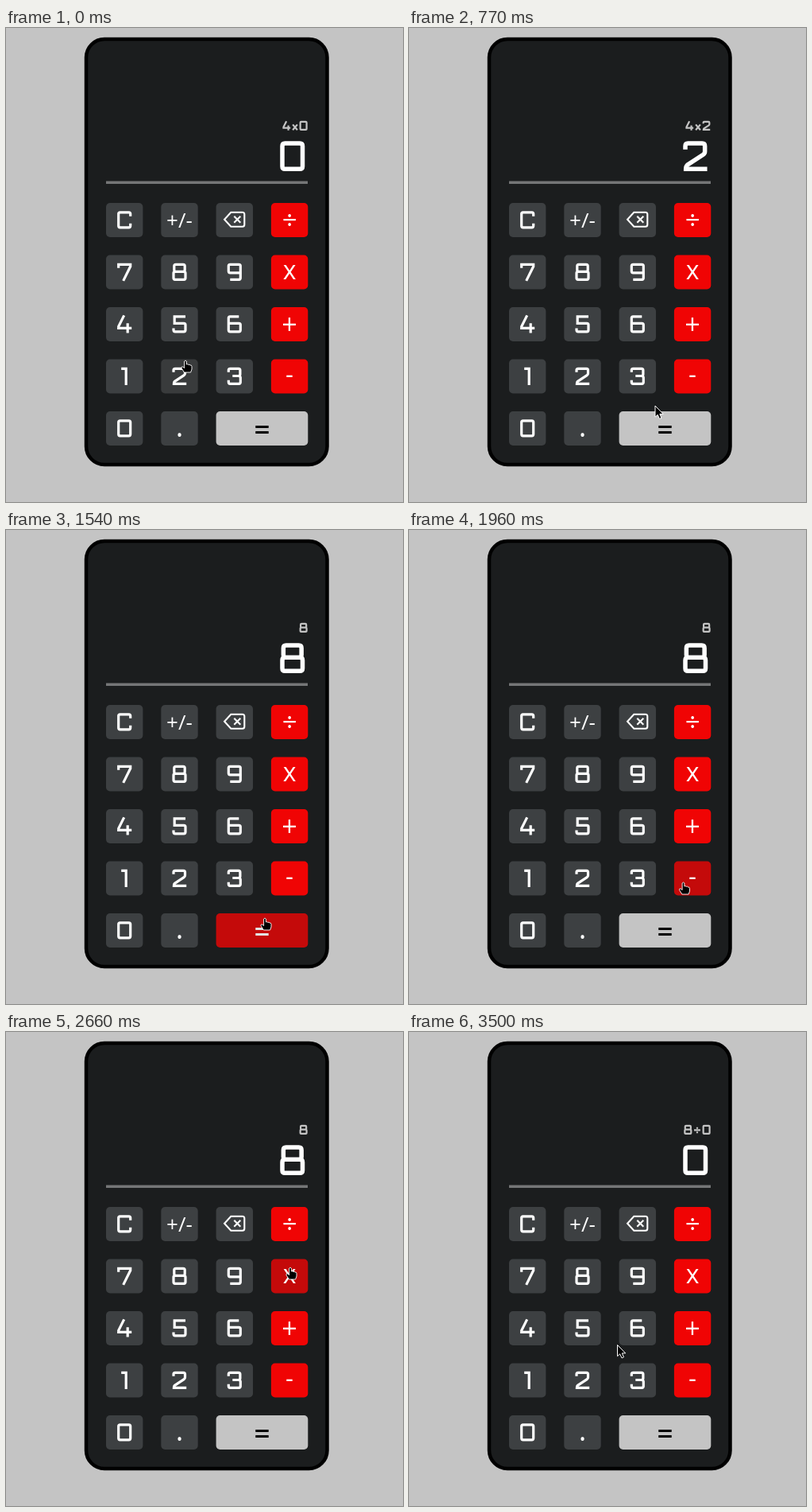
Recreate the animation shown at these times as an HTML page. Size 500 by 596 pixels, loop 3.57 s.

```html
<!DOCTYPE html>
<html lang="en">
<head>
<meta charset="utf-8">
<title>Calculator</title>
<style>
  html, body { margin: 0; width: 100%; height: 100%; overflow: hidden; background: #c4c4c4; }
  svg { display: block; }
  text { font-family: "Open Sans", sans-serif; font-weight: 500; fill: #fff; text-anchor: middle; }
  .key rect { fill: #3d4042; }
  .key.hover rect { fill: #393b3c; }
  .op rect { fill: #f00404; }
  .op.hover rect, .eq.hover rect { fill: #c40a0a; }
  .eq rect { fill: #c4c4c4; }
  .eq text { fill: #000; font-weight: 600; }
  .eq.hover text { fill: #e4e4e4; }
  .line { fill: none; stroke: #fff; stroke-width: 3.2; }
  .line path { vector-effect: non-scaling-stroke; }
  #value { stroke-width: 5.5; }
  #expr { stroke: #c4c4c4; stroke-width: 2.2; }
  .cursor { fill: #000; stroke: #fff; stroke-linejoin: round; }
</style>
</head>
<body>
<svg id="stage" width="500" height="596" viewBox="0 0 500 596">
  <rect x="101" y="14" width="303.5" height="535" rx="23" fill="#1b1d1e" stroke="#000" stroke-width="4.5"/>
  <rect x="126" y="192.5" width="254" height="3.5" fill="#757677"/>
  <g id="expr" class="line"></g>
  <g id="value" class="line"></g>
  <g id="keys"></g>
  <path id="arrow" class="cursor" stroke-width="1"
    d="M0 0V14.2L3.2 11.3L5.5 16.4L8 15.3L5.8 10.4H10.2Z"/>
  <path id="hand" class="cursor" stroke-width=".9"
    d="M-1.4 1Q0 -1 1.4 1V5Q2.8 4.2 3.8 5.4Q5.2 4.7 6 6Q7.8 5.6 8 7.5V11L6.6 15H-1.6L-5 9.6Q-5.2 7.4 -3.2 8L-1.4 9.6Z"/>
</svg>
<script>
const LOOP = 3570;

// Squared glyphs as centre lines in a 15 x 19 box
const GLYPHS = {
  0: 'M2 0H13Q15 0 15 2V17Q15 19 13 19H2Q0 19 0 17V2Q0 0 2 0Z',
  1: 'M3.5 0H9.5V20.6',
  2: 'M0 4.5V2Q0 0 2 0H12.5Q14.5 0 14.5 2V6Q14.5 7.5 13.2 8.4L1.5 16Q.4 17 .4 19H16.2',
  3: 'M0 4.5V2Q0 0 2 0H12.6Q14.6 0 14.6 2V7Q14.6 9.2 12.6 9.2H5M12.6 9.2Q15 9.2 15 11.4V17Q15 19 13 19H2Q0 19 0 17V14.5',
  4: 'M7 -1.4L0 12.5V14.6H16.5M11.5 8.5V20.6',
  5: 'M15 0H1.2V8.5H13Q15 8.5 15 10.5V17Q15 19 13 19H2Q0 19 0 17V14.8',
  6: 'M13 0H2Q0 0 0 2V17Q0 19 2 19H13Q15 19 15 17V10.5Q15 8.5 13 8.5H0',
  7: 'M0 4.5V0H15V2.5L6 20.6',
  8: 'M2.8 0H12.2Q14.2 0 14.2 2V7Q14.2 9 12.2 9H2.8Q.8 9 .8 7V2Q.8 0 2.8 0ZM2 9H13Q15 9 15 11V17Q15 19 13 19H2Q0 19 0 17V11Q0 9 2 9Z',
  9: 'M2 19H13Q15 19 15 17V2Q15 0 13 0H2Q0 0 0 2V8.5Q0 10.5 2 10.5H15',
  C: 'M15 5V2Q15 0 13 0H2Q0 0 0 2V17Q0 19 2 19H13Q15 19 15 17V14',
  x: 'M0 6.5L11 19.5M11 6.5L0 19.5',
  '÷': 'M0 10.5H15M7.5 3.5V7.2M7.5 13.8V17.5'
};

const ROWS = [['C', '+/-', '⌫', '÷'], ['7', '8', '9', 'x'], ['4', '5', '6', '+'], ['1', '2', '3', '-'], ['0', '.', '=']];

// Font size and baseline below the key centre
const LABELS = { '+/-': [26, 9.5], '÷': [33, 11.6], x: [32, 8.5], '+': [34, 12.2], '-': [31, 8.4], '.': [36, 10.5], '=': [35, 13] };

// Time, cursor tip, key under the cursor
const MOVES = [
  [0, 226, 418, '2'], [560, 230, 424, '2'], [700, 270, 452, ''], [770, 310, 475, ''],
  [910, 318, 486, '='], [1120, 324, 490, '='], [1330, 326, 490, '='], [1540, 326, 488, '='],
  [1820, 328, 486, '='], [1960, 345.5, 443, '-'], [2030, 347, 440, '-'], [2170, 356, 380, '+'],
  [2240, 358, 368, '+'], [2380, 361, 323, ''], [2450, 360, 313, 'x'], [2590, 358, 296, 'x'],
  [2800, 354, 250, '÷'], [3080, 353, 250, '÷'], [3220, 322, 302, ''], [3290, 306, 322, '9'],
  [3430, 272, 375, '6'], [3500, 262.5, 393.5, '']
];

// Time, expression, value
const SCREENS = [[0, '4x0', '0'], [490, '4x2', '2'], [1540, '8', '8'], [3080, '8÷0', '0']];

const $ = id => document.getElementById(id);
const keys = {};

function add(parent, tag, attrs, text) {
  const el = document.createElementNS('http://www.w3.org/2000/svg', tag);
  for (const name in attrs) el.setAttribute(name, attrs[name]);
  if (text) el.textContent = text;
  return parent.appendChild(el);
}

function glyph(parent, ch, x, y, scale = 1) {
  add(parent, 'path', { d: GLYPHS[ch], transform: `translate(${x} ${y}) scale(${scale})` });
}

function addKey(label, col, row) {
  const x = 126 + col * 69.3, y = 220 + row * 65.5;
  const w = label === '=' ? 115.7 : 46.4;
  const cx = x + w / 2, cy = y + 21.5;
  const kind = label === '=' ? 'eq' : col === 3 ? 'op' : '';
  const g = add($('keys'), 'g', { class: 'key ' + kind, 'aria-label': label });
  add(g, 'rect', { x, y, width: w, height: 43, rx: 5 });
  if (LABELS[label]) {
    const [size, drop] = LABELS[label];
    add(g, 'text', { x: cx, y: cy + drop, 'font-size': size }, label);
  } else {
    const line = add(g, 'g', { class: 'line' });
    if (label === '⌫') {
      add(line, 'path', {
        d: 'M-4.5 -9H10Q12.5 -9 12.5 -6.5V6.5Q12.5 9 10 9H-4.5L-12.7 0ZM-.5 -4L7.5 4M7.5 -4L-.5 4',
        transform: `translate(${cx} ${cy - .7})`, 'stroke-width': 2.1, style: 'stroke-width:2.1'
      });
    } else glyph(line, label, cx - 7.5, cy - 9.7);
  }
  keys[label] = g;
}

function showScreen([, expr, value]) {
  $('expr').replaceChildren();
  $('value').replaceChildren();
  $('expr').setAttribute('aria-label', expr);
  $('value').setAttribute('aria-label', value);
  let right = 378.6;
  for (const ch of [...expr].reverse()) {
    const w = (ch === 'x' ? 11 : 15) * .53;
    glyph($('expr'), ch, right - w, 117.9, .53);
    right -= w + 3.7;
  }
  glyph($('value'), value, 348, 145, 1.7);
}

function showCursor([, x, y, over]) {
  for (const label in keys) keys[label].classList.toggle('hover', label === over);
  const place = `translate(${x} ${y})`;
  $('arrow').setAttribute('transform', place);
  $('hand').setAttribute('transform', place);
  $('arrow').style.display = over ? 'none' : '';
  $('hand').style.display = over ? '' : 'none';
}

const at = (list, t) => list.findLast(item => item[0] <= t);
let screen, move;

function draw() {
  const t = performance.now() % LOOP;
  const nextScreen = at(SCREENS, t), nextMove = at(MOVES, t);
  if (nextScreen !== screen) showScreen(screen = nextScreen);
  if (nextMove !== move) showCursor(move = nextMove);
  requestAnimationFrame(draw);
}

ROWS.forEach((row, r) => row.forEach((label, c) => addKey(label, c, r)));
draw();
</script>
</body>
</html>
```
